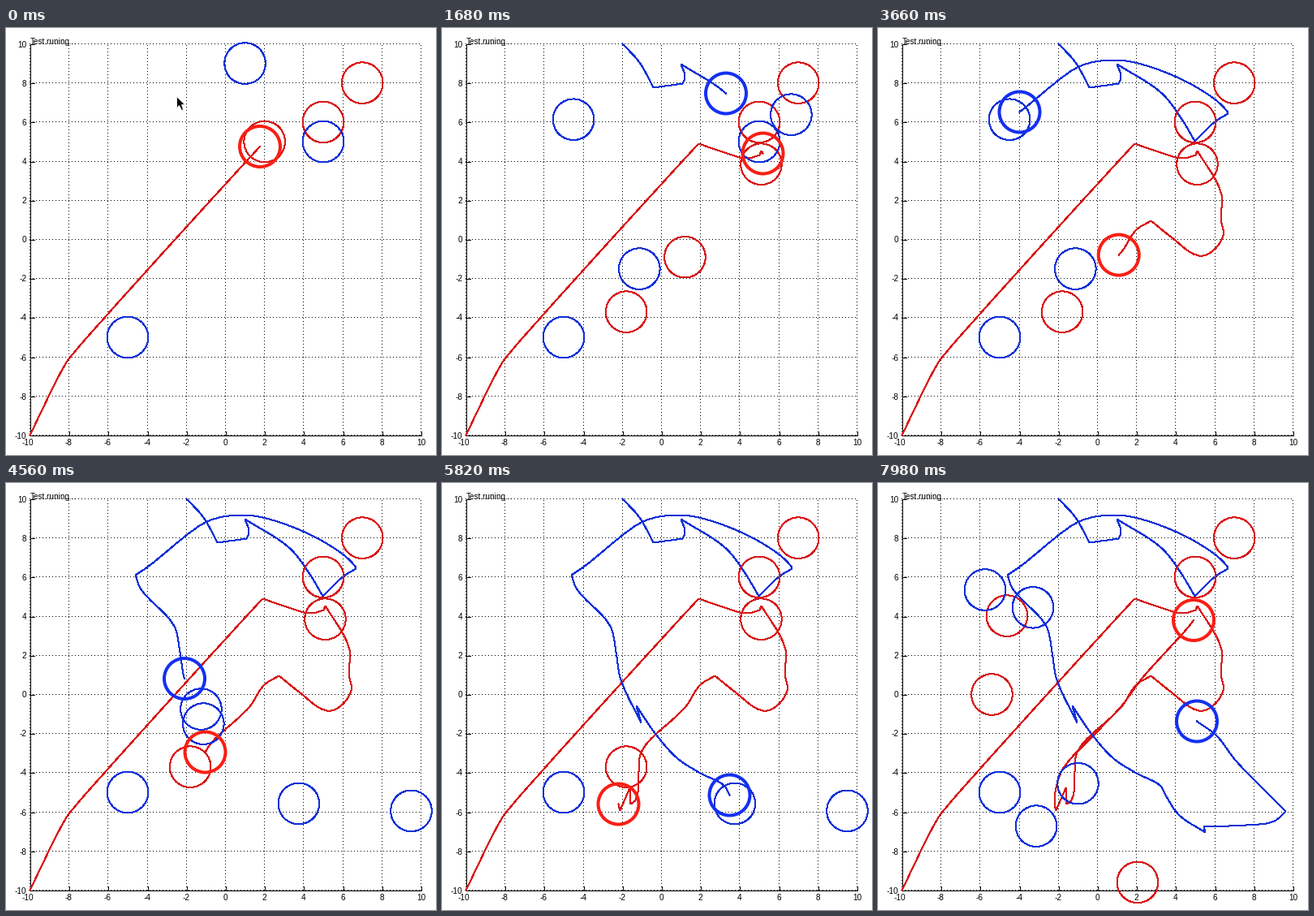
A matplotlib script that plays this animation: 530 px wide and 526 px high, repeating every 8 s.

```python
import numpy as np
import matplotlib.pyplot as plt
from matplotlib.animation import FuncAnimation
from matplotlib.patches import Circle, Polygon

W, H = 530, 526
LEFT, TOP, UNIT = 29, 19, 24.1
SPAN = 20 * UNIT
PX = 0.72                      # one pixel in points at 100 dpi
TICK, STEP, LOOP = 20, 60, 8000
RADIUS = 25.3
FINE = 6                       # samples per path segment
THIN = {"r": "#d81818", "b": "#1030d8"}
BOLD = {"r": "#fa1e14", "b": "#1430f0"}

plt.rcParams["font.family"] = "Liberation Sans"
fig = plt.figure(figsize=(W / 100, H / 100), dpi=100, facecolor="white")
ax = fig.add_axes([0, 0, 1, 1])
ax.set_xlim(-0.5, W - 0.5)
ax.set_ylim(H - 0.5, -0.5)
ax.axis("off")


def to_px(x, y):
    return LEFT + (x + 10) * UNIT, TOP + (10 - y) * UNIT


def line(xs, ys, color="k", **kw):
    return ax.plot(xs, ys, color=color, lw=PX, antialiased=False, **kw)[0]


def label(x, y, text, ha):
    ax.text(x, y, text, fontsize=10 * PX, ha=ha, va="baseline", zorder=6)


def draw_axes():
    right, bottom = LEFT + SPAN, TOP + SPAN
    dots = dict(linestyle=(0, (1, 3)), snap=False, dash_capstyle="butt")
    for v in range(-10, 11, 2):
        x, y = (round(p) for p in to_px(v, v))
        line([x, x], [bottom + 0.5, TOP - 0.5], **dots)
        line([LEFT - 0.5, right + 0.5], [y, y], **dots)
        line([x, x], [bottom, bottom - 5])
        line([LEFT, LEFT + 5], [y, y])
        label(x - (2.5 if v == -10 else 0.5 if v < 0 else 0), 513, str(v), "center")
        label(25, y + 4, str(v), "right")
    line([LEFT, LEFT], [TOP, bottom])
    line([LEFT, right], [bottom, bottom])
    label(29.5, 20, "Test.runing...", "left")


def smooth(pts):
    """Curve through the points that keeps sharp turns sharp."""
    chords = np.diff(pts, axis=0)
    size = np.hypot(*chords.T)[:, None]
    dirs = chords / size
    ahead, back = dirs.copy(), dirs.copy()      # tangents at segment start, end
    for i in range(1, len(dirs)):
        if dirs[i - 1] @ dirs[i] > 0.64:
            mean = dirs[i - 1] + dirs[i]
            ahead[i] = back[i - 1] = mean / np.hypot(*mean)
    u = np.arange(FINE)[:, None] / FINE
    curve = []
    for p, c, s, a, b in zip(pts, chords, size, ahead, back):
        pull = min(s[0], 60)
        curve.append(p + c * u * u * (3 - 2 * u)
                     + pull * u * (1 - u) * ((1 - u) * a - u * b))
    return np.vstack(curve + [pts[-1:]])


class Robot:
    """A ring that follows way points; a third value is the time it gets there."""

    def __init__(self, color, points, start=0):
        self.start = start
        self.xy = smooth(np.array([p[:2] for p in points], float))
        steps = np.hypot(*np.diff(self.xy, axis=0).T)
        self.dist = np.concatenate([[0], np.cumsum(steps)])
        timed = [(p[2], d) for p, d in zip(points, self.dist[::FINE]) if len(p) == 3]
        self.times, self.marks = zip(*timed)
        self.trace = line([], [], THIN[color], zorder=3)
        self.ring = Circle((0, 0), 25, fill=False, ec=BOLD[color], lw=4 * PX, zorder=5)
        ax.add_patch(self.ring)

    def show(self, t):
        d = np.interp(t, self.times, self.marks)
        pos = [np.interp(d, self.dist, self.xy[:, i]) for i in (0, 1)]
        self.trace.set_data(*np.vstack([self.xy[self.dist < d], pos]).T)
        self.ring.center = pos
        for part in (self.trace, self.ring):
            part.set_visible(t >= self.start)


class Target:
    def __init__(self, color, start, x, y, end=LOOP):
        self.start, self.end = start, end
        self.ring = Circle(to_px(x, y), RADIUS, fill=False, ec=THIN[color],
                           lw=PX, antialiased=False, zorder=4)
        ax.add_patch(self.ring)

    def show(self, t):
        self.ring.set_visible(self.start <= t < self.end)


class Pointer:
    def __init__(self, x, y):
        shape = [(0, 0), (0, 14), (3, 11), (6, 17), (8, 16), (6, 10), (10, 10)]
        self.arrow = Polygon([(x + u, y + v) for u, v in shape], fc="k", ec="#e4e8ee",
                             lw=PX, zorder=7)
        ax.add_patch(self.arrow)

    def show(self, t):
        self.arrow.set_visible(t < STEP)


draw_axes()

red = Robot("r", [
    (29, 501), (76, 408), (312.5, 145.5, 0), (316, 142, 120), (345, 152),
    (376, 160), (391, 156), (393, 151), (395, 154, 1680), (423, 205), (422, 235),
    (425, 255), (408, 277), (395, 280, 2520), (361.5, 257.5, 2820), (336, 237),
    (318, 248), (300, 275, 3360), (289, 286, 4200), (245, 331, 4560), (242, 355),
    (238, 390), (232, 395, 5040), (231, 375), (219, 403), (217, 395, 5820),
    (225, 356, 6480), (237, 339, 6720), (245.5, 330, 6780), (299, 275),
    (325, 240), (382, 177, 7560), (388.5, 168.5, 7620)])

blue = Robot("b", [
    (222, 19), (243, 42, 60), (260, 73), (296, 68), (299, 60), (294, 44, 900),
    (349.5, 80, 1680), (374, 112), (390, 139, 2220), (416, 114, 2520),
    (431, 105, 2760), (430, 102.5, 2820), (398, 76), (340, 49), (294, 39),
    (247, 47, 3360), (174, 103, 3660), (159, 113, 4120), (165, 129, 4200),
    (207, 176), (214, 208), (219.5, 240.5, 4560), (245, 295, 4740),
    (239, 274, 5040), (263, 309), (290, 339), (318, 357), (348, 373),
    (354, 384, 5820), (370, 408), (403, 430), (401, 423, 6600),
    (433, 422, 6720), (451.5, 421, 6780), (488, 416), (502, 404, 7080),
    (440, 341), (417, 311, 7560), (392.5, 293, 7860)], start=STEP)

actors = [red, blue, Pointer(210, 84)]


def spawn(color, start, *spots):
    actors.extend(Target(color, start, *spot) for spot in spots)


spawn("r", 0, (2, 5, 120), (5, 6), (7, 8))
spawn("r", 120, (5.1, 3.85, 7680), (1.2, -0.9, 3360), (-1.8, -3.7, 6480))
spawn("r", 7680, (-4.63, 4.02), (-5.4, 0), (2.05, -9.6))
spawn("b", 0, (1, 9, 900), (5, 5, 2220), (-5, -5))
spawn("b", 900, (-4.5, 6.13, 4140), (6.63, 6.38, 2760), (-1.13, -1.5, 4740))
spawn("b", 4140, (-1.25, -0.75, 5040), (3.75, -5.58, 6000), (9.5, -5.95, 7080))
spawn("b", 6000, (-3.3, 4.45), (5, -1.35, 7860))
spawn("b", 7860, (-5.75, 5.35), (-1, -4.55), (-3.13, -6.73))


def update(frame):
    t = frame * TICK // STEP * STEP
    for actor in actors:
        actor.show(t)
    return []


anim = FuncAnimation(fig, update, frames=LOOP // TICK, interval=TICK,
                     init_func=lambda: update(0), repeat=True, repeat_delay=0)
plt.show()
```
